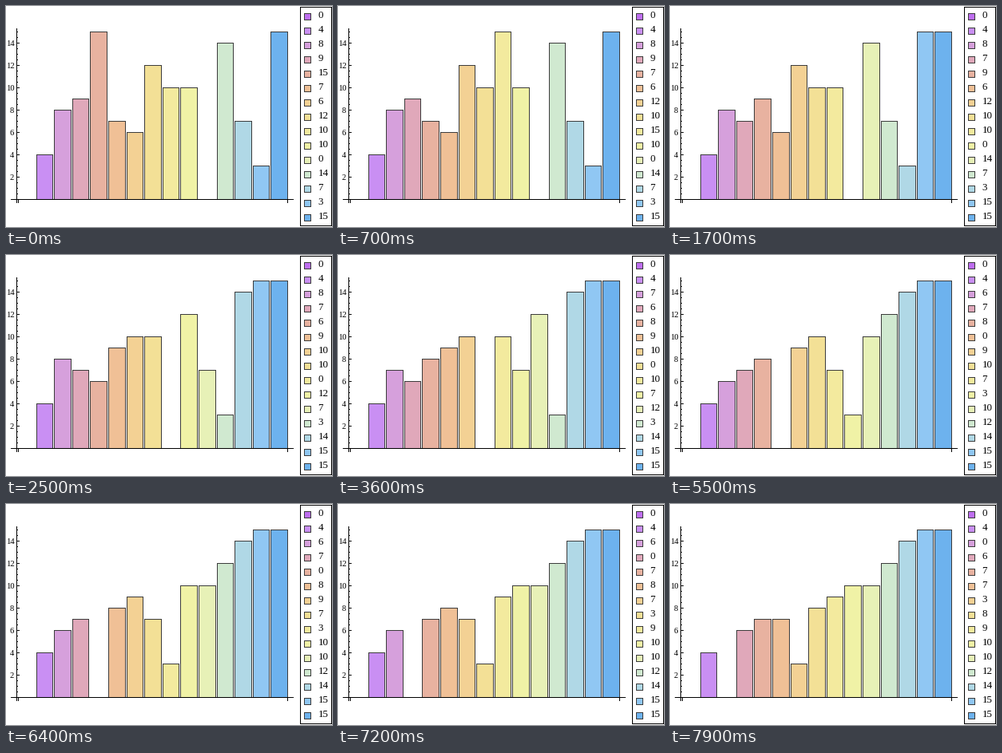
Recreate the animation shown at these times as a matplotlib script. Size 408 by 277 pixels, loop 8 s.

```python
import matplotlib.pyplot as plt
from matplotlib.animation import FuncAnimation
from matplotlib.patches import Rectangle

W, H, DPI = 408, 277, 100
PX = 72 / DPI                      # one pixel in points
FRAMES, INTERVAL = 80, 100
BASE, UNIT = 242, 14               # y of the x axis, pixels per value
START = [0, 4, 8, 9, 15, 7, 6, 12, 10, 10, 0, 14, 7, 3, 15]
COLORS = ["#be6ef0", "#c98ff3", "#d6a0dc", "#e0a8ba", "#e8b2a0",
          "#f0c096", "#f3d194", "#f3e096", "#f3ea9e", "#f0f2a6",
          "#e7f1b7", "#d0e9d0", "#b0d8e6", "#90c7f3", "#6db2ee"]
EDGE = "#3c3c3c"


def bubble_states(values):
    """Yield the list after every single comparison."""
    a = list(values)
    for end in range(len(a) - 1, 0, -1):
        for j in range(end):
            if a[j] > a[j + 1]:
                a[j], a[j + 1] = a[j + 1], a[j]
            yield list(a)


states = list(bubble_states(START))[:FRAMES]

fig = plt.figure(figsize=(W / DPI, H / DPI), dpi=DPI, facecolor="white")
ax = fig.add_axes([0, 0, 1, 1])
ax.set_xlim(0, W)
ax.set_ylim(H, 0)
ax.axis("off")


def box(x0, y0, x1, y1, fill="none", edge=EDGE):
    """Outlined box; snapping centres its border on pixels x0..x1, y0..y1."""
    return ax.add_patch(Rectangle((x0, y0), x1 - x0, y1 - y0, fc=fill, ec=edge,
                                  lw=PX, aa=False, snap=True))


def line(x0, y0, x1, y1):
    """Solid black run of pixels, both ends included."""
    ax.add_patch(Rectangle((x0, y0), x1 - x0 + 1, y1 - y0 + 1, fc="black",
                           lw=0, aa=False, zorder=3))


def digits(x, y, text, size, ha):
    return ax.text(x, y, text, ha=ha, va="baseline", size=size * PX,
                   family="Liberation Serif")


# Axes
line(6, BASE, 359, BASE)
line(13, 28, 13, 246)
line(15, BASE, 15, 246)
line(352, BASE, 352, 246)
for k in range(1, 31):
    y = BASE - k * UNIT // 2
    line(13, y, 16 if k % 4 == 0 else 14, y)
for v in range(2, 15, 2):
    digits(10.2, BASE - v * UNIT + 4, str(v), 10.5, "right")

# Bars and legend
box(368, 1, 407, 275, edge="black")
bars, labels = [], []
for i, color in enumerate(COLORS):
    x = 15.63 + 22.58 * i
    bars.append(box(int(x), BASE, int(x + 20.6), BASE, color))
    y = 18 * i
    box(373, y + 9, 381, y + 17, color)
    labels.append(digits(390.4, y + 15, "", 13, "left"))


def update(n):
    for v, bar, label in zip(states[n], bars, labels):
        bar.set_y(BASE - v * UNIT)
        bar.set_height(v * UNIT)
        bar.set_visible(v > 0)
        label.set_text(str(v))
    return bars + labels


anim = FuncAnimation(fig, update, frames=FRAMES, interval=INTERVAL,
                     init_func=lambda: update(0), repeat=True, repeat_delay=0)
plt.show()
```
